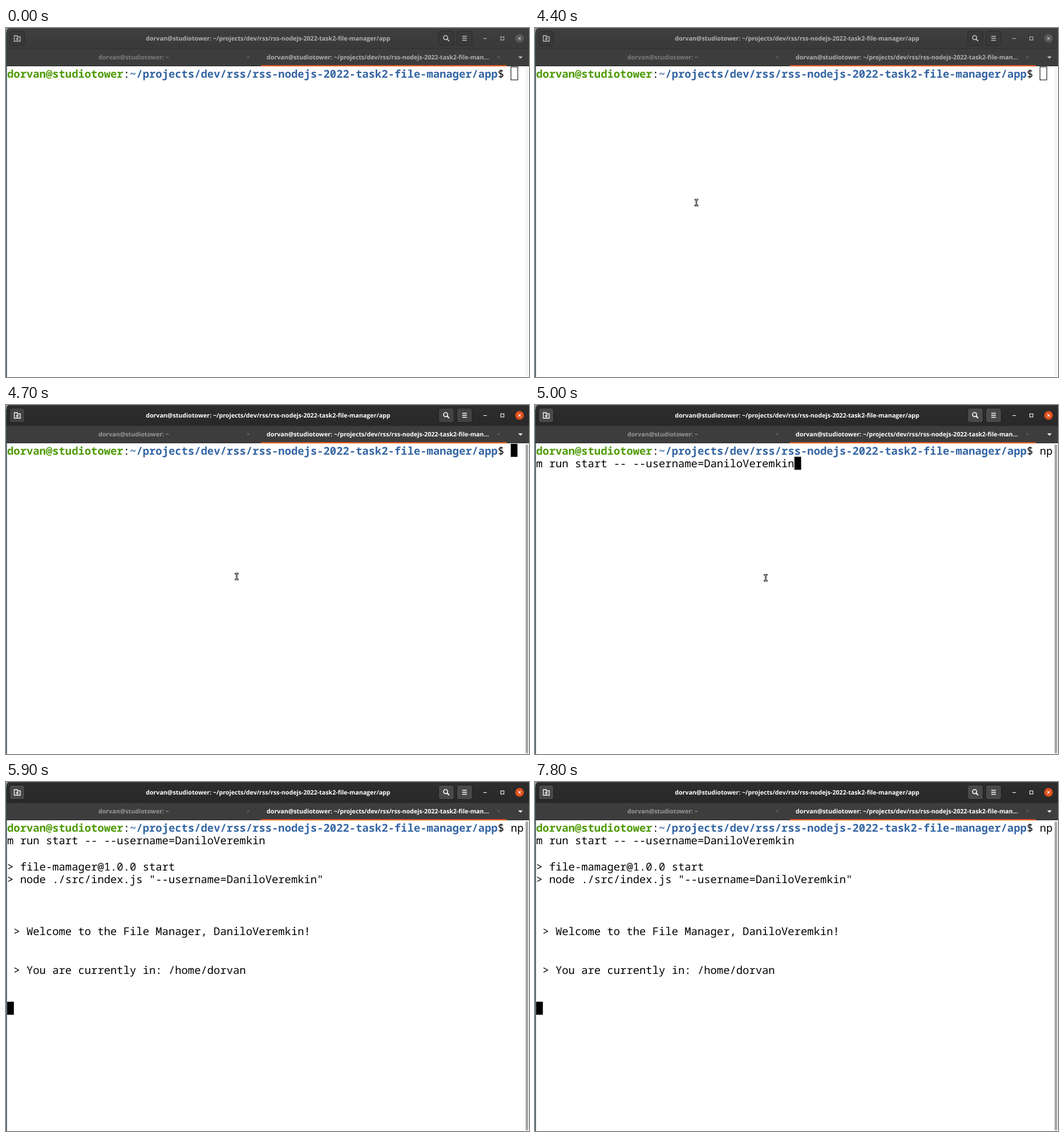
Recreate the animation shown at these times as an HTML page. Size 917 by 611 pixels, loop 8000 ms.

```html
<!DOCTYPE html>
<html lang="en">
<head>
<meta charset="utf-8">
<title>Terminal</title>
<style>
  html, body { margin: 0; width: 100%; height: 100%; overflow: hidden; background: #fff; }
  svg {
    display: block;
    --bar: #3f3f3f; --bar2: #393939; --button: #383838; --edge: #2c2c2c;
    --title: #b0b0b0; --icon: #c0c0c0; --dim: #7d7d7d; --close: #595959; --scroll: #f3f3f3;
  }
  svg.focus {
    --bar: #2d2d2d; --bar2: #282828; --button: #424242; --edge: #1f1f1f;
    --title: #fff; --icon: #fff; --dim: #989898; --close: #e1501c; --scroll: #a6a6a6;
  }
  svg.focus.lit { --button: #494949; }
  text { white-space: pre; text-rendering: geometricPrecision; }
  .ui { font: bold 10.66px "Open Sans", "Noto Sans", sans-serif; text-anchor: middle; fill: var(--title); }
  .ui.dim { fill: var(--dim); }
  .term { font: 18.867px "Noto Sans Mono", monospace; }
  .b { font-weight: bold; }
  .button { fill: var(--button); stroke: var(--edge); }
  .icon { fill: none; stroke: var(--icon); stroke-width: 1.3; }
  .small { fill: none; stroke: #747474; stroke-width: 1; }
</style>
</head>
<body>
<svg id="stage" width="917" height="611" viewBox="0 0 917 611">
  <defs>
    <linearGradient id="barFill" x2="0" y2="1">
      <stop style="stop-color:var(--bar)"/>
      <stop offset="1" style="stop-color:var(--bar2)"/>
    </linearGradient>
  </defs>
  <rect width="917" height="611" fill="#fff"/>
  <rect width="1.6" height="611" fill="#35565b"/>
  <rect width="8" height="8" fill="#8aa0a3"/>

  <path d="M1 67V7Q1 0 8 0H917V67Z" fill="#3d3d3d"/>
  <path d="M1 36V7Q1 0 8 0H917V36Z" fill="url(#barFill)"/>
  <path d="M8 .5H917" stroke="#555" stroke-opacity=".6"/>
  <path d="M1 36.5H917" stroke="#303030"/>
  <path d="M1 66.5H917" stroke="#2c2c2c"/>
  <rect x="447" y="65" width="431" height="2.2" fill="#e2571f"/>

  <rect class="button" x="6.5" y="5.5" width="26" height="25" rx="3.5"/>
  <rect class="button" x="758.5" y="5.5" width="27" height="25" rx="3.5"/>
  <rect class="button" x="790.5" y="5.5" width="27" height="25" rx="3.5"/>
  <g class="icon">
    <path d="M14.5 13.5H20V15.5H25V23H14.5ZM17 19.2H22.6M19.8 16.4V22"/>
    <circle cx="770.8" cy="16.8" r="3.6" stroke-width="1.6"/>
    <path d="M773.5 19.5L777 23" stroke-width="1.9"/>
    <path d="M800 14.5H808M800 18H808M800 21.5H808" stroke-width="1.5"/>
    <path d="M837 18.5H843" stroke-width="1.1"/>
    <rect x="867.5" y="15.5" width="5.5" height="5.5" stroke-width="1.1"/>
  </g>
  <circle cx="900.4" cy="18.2" r="7.6" style="fill:var(--close)"/>
  <path d="M898.2 16L902.6 20.4M902.6 16L898.2 20.4" class="icon" style="stroke-width:1.1"/>
  <path d="M898 49.7H906L902 53.7Z" style="fill:var(--icon)"/>
  <path class="small" d="M422.8 49.2L426.6 53M426.6 49.2L422.8 53M861.6 49.2L865.4 53M865.4 49.2L861.6 53"/>

  <text class="ui" x="459.5" y="22">dorvan@studiotower: ~/projects/dev/rss/rss-nodejs-2022-task2-file-manager/app</text>
  <text class="ui dim" x="224" y="55">dorvan@studiotower: ~</text>
  <text class="ui" x="652" y="55">dorvan@studiotower: ~/projects/dev/rss/rss-nodejs-2022-task2-file-man…</text>

  <g class="term" id="lines"></g>
  <rect id="cursor"/>
  <rect x="911" y="69" width="4.6" height="541" rx="2" style="fill:var(--scroll)"/>
  <g id="pointer" fill="none" stroke-linecap="square">
    <path id="beam" d="M-2 -5.2H2M0 -5.2V5.2M-2 5.2H2" stroke="#111" stroke-width="2.6"/>
    <path d="M-2 -5.2H2M0 -5.2V5.2M-2 5.2H2" stroke="#e8e8e8" stroke-width=".8"/>
  </g>
</svg>
<script>
const LOOP = 8000, LEFT = 2, TOP = 68, COL = 11.32, ROW = 22.62;
const byId = id => document.getElementById(id);
const stage = byId('stage'), lines = byId('lines'), cursor = byId('cursor'), pointer = byId('pointer');
const user = 'DaniloVeremkin';

// [visible from ms, row, column, text, colour, bold]
const texts = [
  [0, 0, 0, 'dorvan@studiotower', '#4e9a06', true],
  [0, 0, 18, ':'],
  [0, 0, 19, '~/projects/dev/rss/rss-nodejs-2022-task2-file-manager/app', '#3465a4', true],
  [0, 0, 76, '$'],
  [5000, 0, 78, 'np'],
  [5000, 1, 0, `m run start -- --username=${user}`],
  [5700, 3, 0, '> file-mamager@1.0.0 start'],
  [5700, 4, 0, `> node ./src/index.js "--username=${user}"`],
  [5900, 8, 1, `> Welcome to the File Manager, ${user}!`],
  [5900, 11, 1, '> You are currently in: /home/dorvan'],
].map(([from, row, col, text, fill = '#000', bold]) => {
  const node = document.createElementNS('http://www.w3.org/2000/svg', 'text');
  node.textContent = text;
  setAttrs(node, { x: LEFT + col * COL, y: TOP + 18.7 + row * ROW, fill, class: bold ? 'b' : '' });
  lines.append(node);
  return { from, node };
});

// [from ms, row, column]
const cursorStops = [[0, 0, 78], [5000, 1, 40], [5400, 2, 0], [5700, 6, 0], [5900, 14, 0]];
// [from ms, x, y]; no position means hidden
const pointerStops = [
  [0], [100, 304, 265.5], [300, 305, 265.5], [400],
  [4400, 283, 305.7], [4500, 404.5, 300.3], [4800, 404.5, 302.5], [5400],
  [6400, 500, 290], [6500, 526, 273.5], [6900],
];

function setAttrs(node, attrs) {
  for (const key in attrs) node.setAttribute(key, attrs[key]);
}
function show(node, on) {
  node.style.visibility = on ? 'visible' : 'hidden';
}
const current = (stops, t) => stops.findLast(stop => stop[0] <= t);

function draw(t) {
  const focused = t >= 4700;
  stage.classList.toggle('focus', focused);
  stage.classList.toggle('lit', t >= 4800);
  for (const { from, node } of texts) show(node, t >= from);

  const [, row, col] = current(cursorStops, t);
  const x = LEFT + col * COL, y = TOP + row * ROW;
  setAttrs(cursor, focused
    ? { x, y, width: 11.8, height: 22.8, fill: '#000', stroke: 'none' }
    : { x: x + .4, y: y + .1, width: 12, height: 22.8, fill: 'none', stroke: '#000' });
  const blinkedOff = t >= 5400 && Math.floor((t - 5400) / 600) % 2;
  show(cursor, !blinkedOff);

  const [, px, py] = current(pointerStops, t);
  show(pointer, px !== undefined);
  if (px !== undefined) setAttrs(pointer, { transform: `translate(${px} ${py})` });
}

function tick() {
  draw(performance.now() % LOOP);
  requestAnimationFrame(tick);
}
tick();
</script>
</body>
</html>
```
